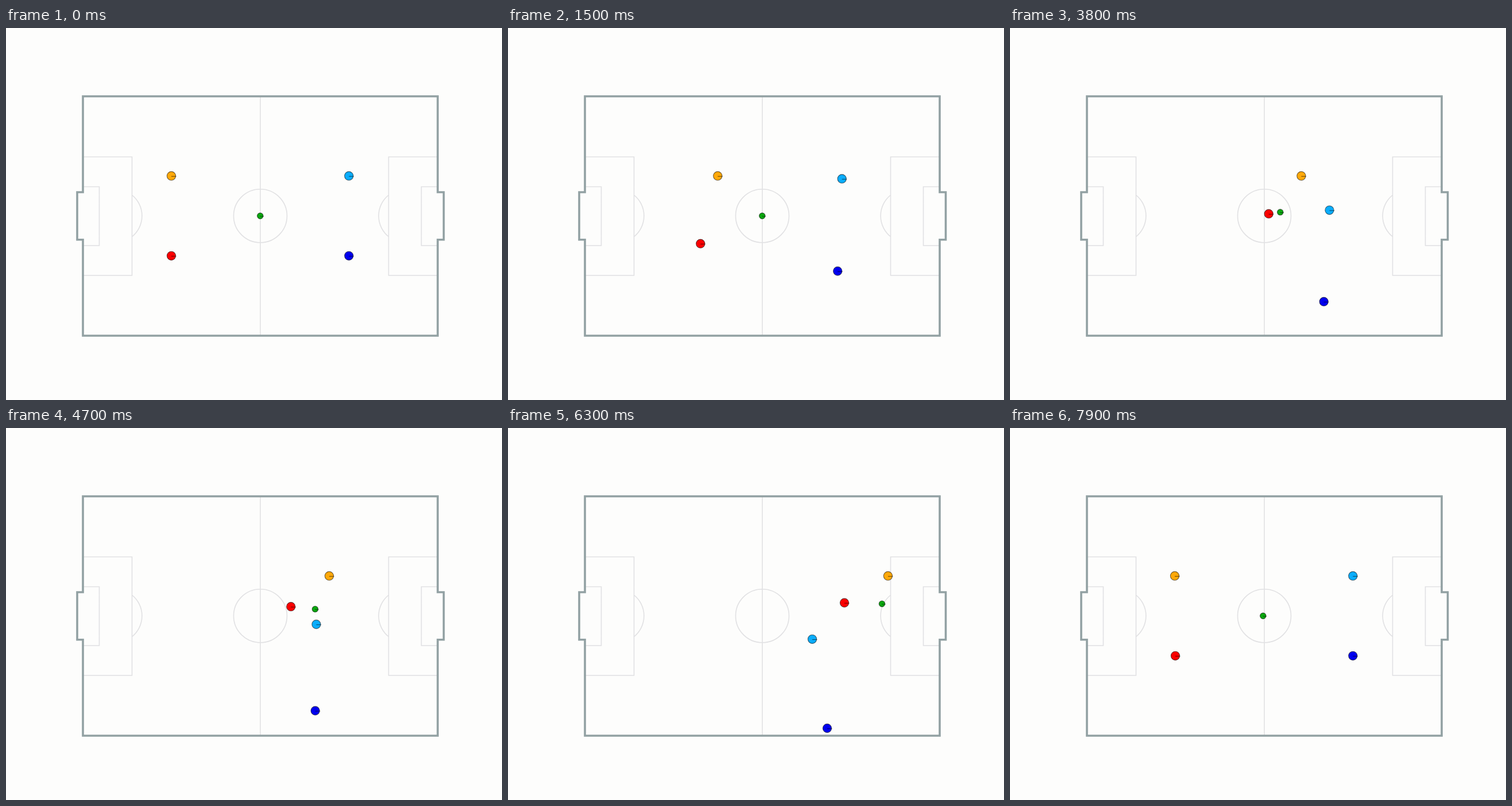
Write an HTML page that moves like this. It is 864 px wide and 648 px high and loops after 8000 ms.

```html
<!DOCTYPE html>
<html>
<head>
<meta charset="utf-8">
<style>
html, body { margin: 0; width: 100%; height: 100%; overflow: hidden; background: #fdfdfc; }
svg { display: block; }
</style>
</head>
<body>
<svg id="stage" width="864" height="648" viewBox="0 0 864 648" fill="none">
  <g stroke="#e1e1e3" stroke-width="1.6">
    <path d="M443 119V536"/>
    <circle cx="443" cy="327.3" r="46.5"/>
    <path id="area" d="M134 224.5H219.5V431H134M134 276.5H162.5V379H134M219.5 291A46.5 46.5 0 0 1 219.5 363.5"/>
    <use href="#area" transform="translate(886) scale(-1 1)"/>
  </g>
  <path d="M134 119H752V286H762.5V368.7H752V536H134V368.7H124V286H134Z" stroke="#92a1a3" stroke-width="3.6"/>
</svg>
<script>
const STEP = 100, LOOP = 8000, GOAL = 78, KICK = 34.4;
const KEYS = [0, 15, 25, 38, 47, 63];

// Smooth curve through one value per key step, from rest, then straight on.
function spline(values) {
  const last = KEYS.length - 1;
  const rate = i => (values[i + 1] - values[i]) / (KEYS[i + 1] - KEYS[i]);
  const slope = i => i === 0 ? 0 : i === last ? rate(i - 1) : (rate(i - 1) + rate(i)) / 2;
  return n => {
    if (n >= KEYS[last]) return values[last] + slope(last) * (n - KEYS[last]);
    const i = KEYS.findIndex(k => k > n) - 1;
    const h = KEYS[i + 1] - KEYS[i], u = (n - KEYS[i]) / h, v = 1 - u;
    return values[i] * v * v * (1 + 2 * u) + values[i + 1] * u * u * (1 + 2 * v)
      + h * u * v * (slope(i) * v - slope(i + 1) * u);
  };
}

function wander(xs, ys) {
  const x = spline(xs), y = spline(ys);
  return n => [x(n), Math.min(y(n), 528)];
}

// Constant push against drag
const sprint = n => [288 + 6.18 * (n - 2.5 * (1 - Math.exp(-n / 2.5))), 257.7];

function roll(n) {
  const s = Math.max(0, n - KICK);
  return [442.8 + 7.83 * s - 0.0187 * s * s, 327.3 - 4.5 * (1 - Math.exp(-s)) - 0.58 * s];
}

const movers = [
  { color: '#ffa90a', r: 7.6, drift: -1, at: sprint },
  { color: '#fa0000', r: 7.6, drift: 0,
    at: wander([288, 335.3, 390.5, 450.7, 496.3, 586], [396.8, 375.7, 350.7, 323.7, 311.2, 304.5]) },
  { color: '#0aadfc', r: 7.6, drift: 0,
    at: wander([597.3, 581.7, 564, 556.5, 540.5, 530], [257.7, 262.7, 292.7, 317.3, 342, 367.8]) },
  { color: '#0000ee', r: 7.6, drift: 0,
    at: wander([597.3, 574.2, 561.2, 546.7, 538.7, 556], [396.8, 423.5, 454, 476.7, 492.5, 523]) },
  { color: '#0aa80f', r: 5.2, drift: -2, at: roll }
];

function add(parent, tag, attrs) {
  const el = document.createElementNS('http://www.w3.org/2000/svg', tag);
  for (const key in attrs) el.setAttribute(key, attrs[key]);
  return parent.appendChild(el);
}

const stage = document.getElementById('stage');
for (const m of movers) {
  m.el = add(stage, 'g', { stroke: '#000', 'stroke-opacity': 0.55, 'stroke-width': 1.1 });
  add(m.el, 'circle', { r: m.r, fill: m.color });
  add(m.el, 'path', { d: `M0 .7H${m.r + 1}` });
}

// After the goal everyone is back at the kick-off spots and starts to drift.
function place(m, step) {
  if (step < GOAL) return m.at(step);
  const [x, y] = m.at(0);
  return [x + m.drift * (step - GOAL), y];
}

const start = performance.now();
function draw() {
  const step = Math.floor((performance.now() - start) % LOOP / STEP);
  for (const m of movers) m.el.setAttribute('transform', `translate(${place(m, step)})`);
  requestAnimationFrame(draw);
}
draw();
</script>
</body>
</html>
```
